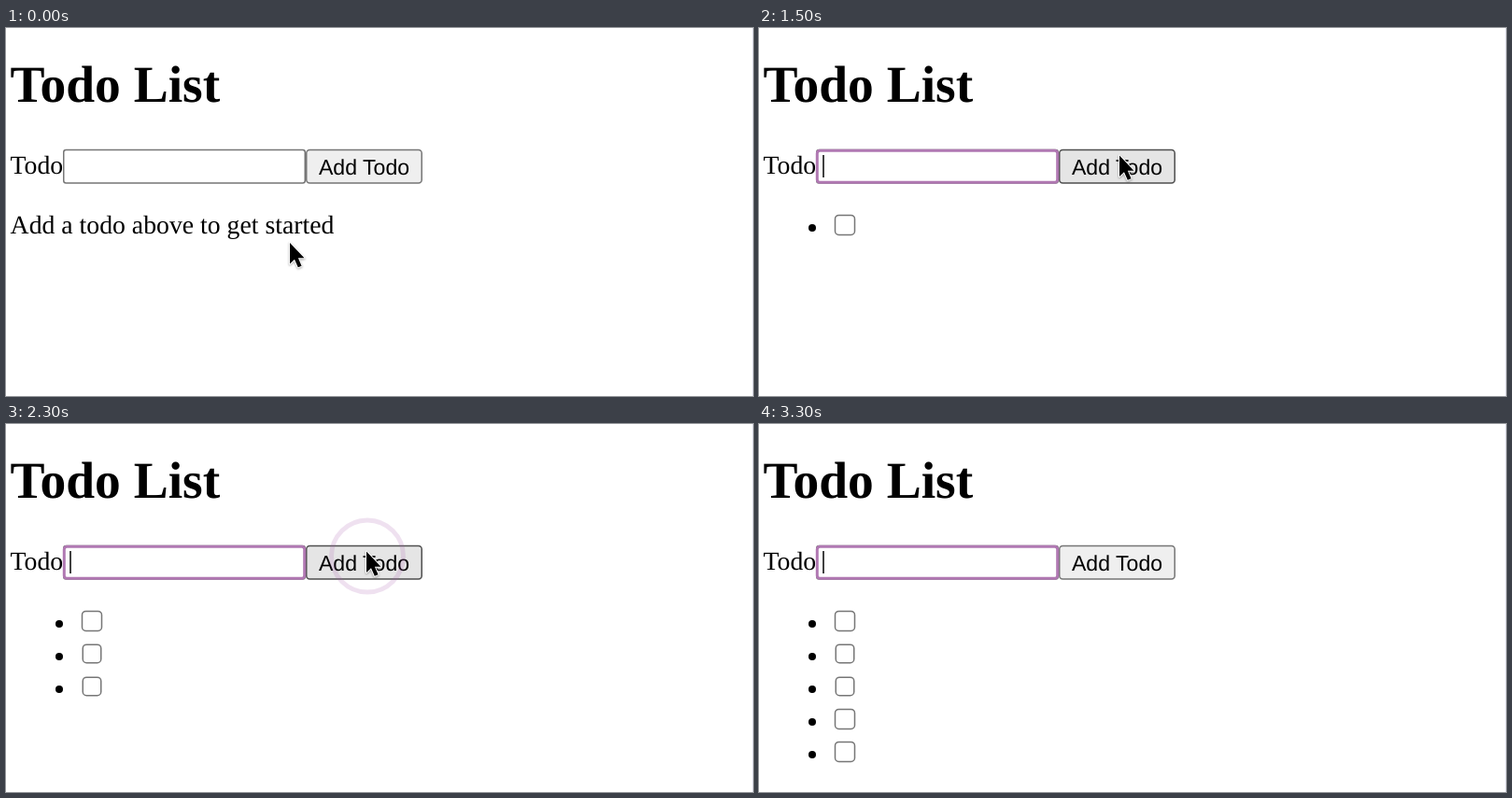
These frames come from a looping animation (800 by 394 pixels, 3.4 s). An HTML page:

```html
<!DOCTYPE html>
<html lang="en">
<head>
<meta charset="utf-8">
<title>Todo List</title>
<style>
  html, body { margin: 0; width: 100%; height: 100%; overflow: hidden; background: #fff; }
  svg { display: block; width: 800px; height: 394px; }
  text { font: 27.76px "Liberation Serif", Times, serif; text-rendering: geometricPrecision; }
  .title { font-size: 55.5px; font-weight: bold; }
  .label { font: 23.1px "Liberation Sans", Arial, sans-serif; text-anchor: middle; }
  .field { fill: #fff; stroke: #767676; stroke-width: 1.5; }
</style>
</head>
<body>
<svg viewBox="0 0 800 394">
  <path d="M799.5 0V394" stroke="#eeeef9"/>
  <text class="title" x="4.5" y="79">Todo List</text>
  <text x="4.6" y="156">Todo</text>
  <rect class="field" x="61.75" y="130.5" width="258.5" height="35.5" rx="2.5"/>
  <rect id="button" x="321.75" y="130.5" width="123.5" height="35.5" rx="3.5" stroke-width="1.5"/>
  <text class="label" x="383.5" y="157">Add Todo</text>
  <g id="focus">
    <rect x="62.3" y="131.3" width="257.4" height="33.9" rx="3" fill="#fff" stroke="#b078b2" stroke-width="3"/>
    <path d="M69 136V160" stroke="#000" stroke-width="1.5"/>
  </g>
  <text id="hint" x="4.6" y="220">Add a todo above to get started</text>
  <g id="list"></g>
  <circle id="ring" cx="387" cy="141.5" fill="none" stroke="#a65aaa" stroke-width="4.8"/>
  <path id="cursor" d="M0 0V22.5L5 17.8L8.8 26.3L12.6 24.7L8.9 16.3H15.5Z"
    stroke="#fff" stroke-width="2" stroke-linejoin="round" paint-order="stroke"
    style="filter: drop-shadow(0 1px 1px #0005)"/>
</svg>
<script>
const LOOP = 3400, STEP = 100;
const PRESSES = [1100, 1600, 2000, 2400, 2900];
const RELEASE = 200;

// Click ring, one pose per step after the press: [radius, opacity]
const RING = [[26, .08], [29.8, .3], [37.4, .5], [38.5, .18]];

const BUTTON = {
  idle: ['#efefef', '#767676'],
  hover: ['#e5e5e5', '#4f4f4f'],
  active: ['#f5f5f5', '#8d8d8d']
};

const $ = id => document.getElementById(id);
const show = (element, visible) => element.setAttribute('visibility', visible ? 'visible' : 'hidden');
const setAll = (element, attributes) => {
  for (const name in attributes) element.setAttribute(name, attributes[name]);
};

const items = PRESSES.map((_, i) => {
  const size = i === 1 || i === 2 ? 19.5 : 21;
  const y = 210.9 + 35 * i;
  const item = document.createElementNS('http://www.w3.org/2000/svg', 'g');
  item.innerHTML = `<circle cx="57" cy="${214 + 35 * i}" r="4"/>
    <rect class="field" x="${92 - size / 2}" y="${y - size / 2}" width="${size}" height="${size}" rx="4"/>`;
  $('list').append(item);
  return item;
});

function cursorAt(time) {
  const p = Math.min(1, Math.max(0, (time - 200) / 600));
  const eased = p * p * (3 - 2 * p);
  const settle = time > 1000 ? 2.5 : 0;
  return [304 + 82 * eased, 230 - 96 * eased + settle];
}

function draw(now) {
  const time = Math.floor(now % LOOP / STEP) * STEP;
  const [x, y] = cursorAt(time);
  const cursorVisible = time < 3300;
  const sincePress = time - PRESSES.findLast(press => press <= time);
  const pressed = sincePress < RELEASE;
  const count = PRESSES.filter(press => press + RELEASE <= time).length;
  const hovered = cursorVisible && x > 321 && y < 166;
  const [fill, stroke] = BUTTON[pressed ? 'active' : hovered ? 'hover' : 'idle'];
  const [r, opacity] = RING[sincePress / STEP] || [0, 0];

  setAll($('button'), { fill, stroke });
  setAll($('ring'), { r, opacity });
  setAll($('cursor'), { transform: `translate(${x} ${y})` });
  show($('cursor'), cursorVisible);
  show($('focus'), count > 0 && !pressed);
  show($('hint'), count === 0);
  items.forEach((item, i) => show(item, i < count));
  requestAnimationFrame(animate);
}

const start = performance.now();
function animate() {
  draw(performance.now() - start);
}
animate();
</script>
</body>
</html>
```
